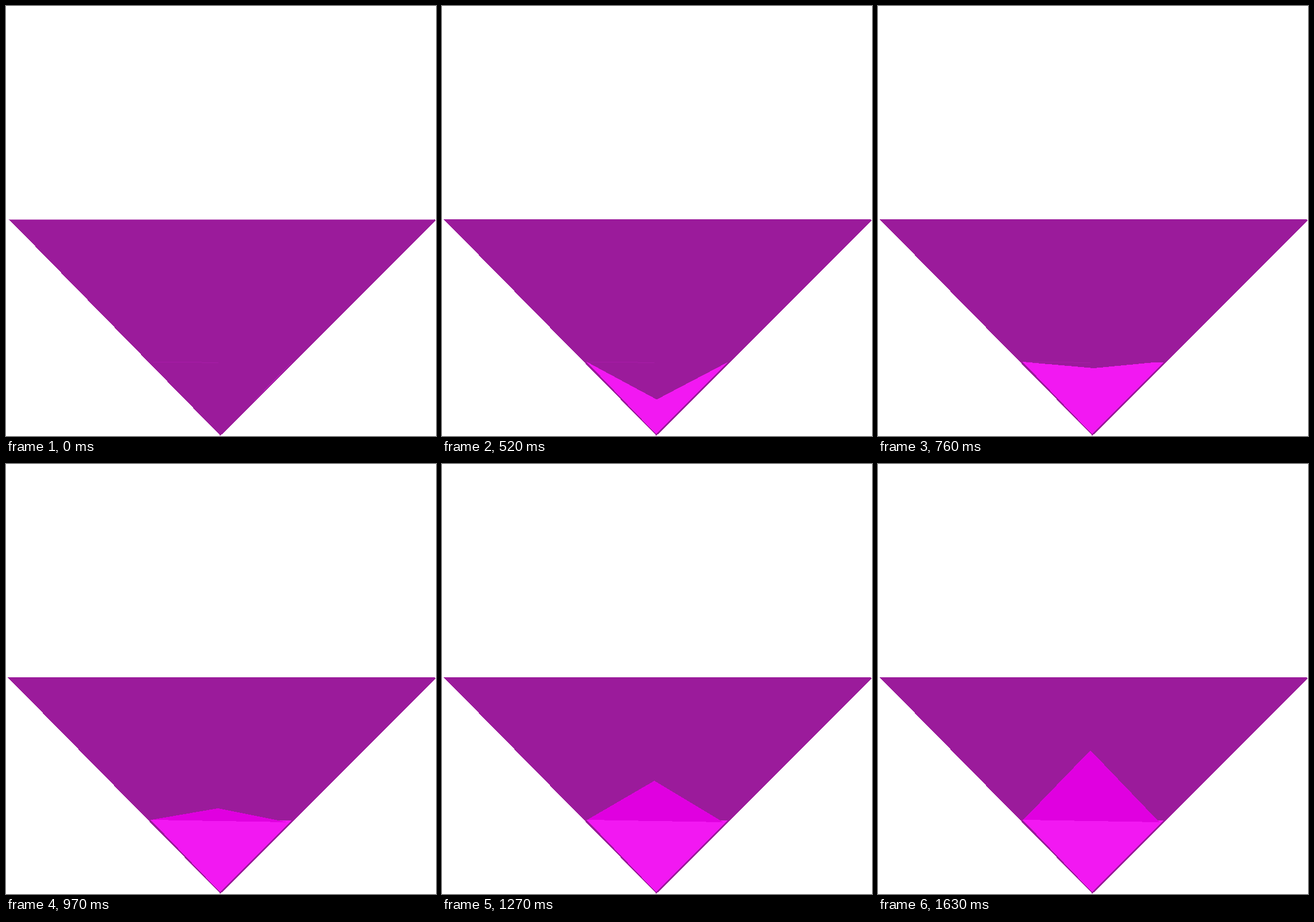
An HTML page for the animation above (1960 ms loop, 749 px wide and 748 px high).

```html
<!DOCTYPE html>
<html lang="en">
<head>
<meta charset="utf-8">
<title>Folding corner</title>
<style>
  html, body { margin: 0; width: 100%; height: 100%; overflow: hidden; background: #fff; }
  svg { display: block; width: 749px; height: 748px; }
</style>
</head>
<body>
<svg viewBox="0 0 749 748" shape-rendering="crispEdges">
  <polygon id="sheet" fill="#9b1b9b"/>
  <path id="teeth" stroke="#fff" stroke-dasharray="1 1" fill="none"/>
  <path id="crease" d="M256 619.5H312L370 620.5" stroke="#a81ca8" fill="none"/>
  <path id="glint" d="M498 620L432 687" stroke="#b81cb8" fill="none"/>
  <polygon id="inside" fill="#f218f2"/>
  <polygon id="flap" fill="#e000e0"/>
</svg>
<script>
  const LOOP = 1960, STEP = 30, START = 250, TURN = 790, END = 1630;
  const el = id => document.getElementById(id);
  const show = (id, on) => el(id).setAttribute('visibility', on ? 'visible' : 'hidden');
  const points = (id, list) => el(id).setAttribute('points', list.join(' '));

  // [time, x, y] of the moving corner
  const lift = [[250, 371, 744], [310, 372, 732], [520, 374, 684.5], [760, 376, 630]];
  const fold = [[790, 369, 621], [970, 369, 599], [1270, 370, 551], [1300, 370, 545], [1630, 370, 498]];

  function along(path, t) {
    let i = 1;
    while (i < path.length - 1 && t > path[i][0]) i++;
    const a = path[i - 1], b = path[i];
    const k = Math.min(1, Math.max(0, (t - a[0]) / (b[0] - a[0])));
    return [a[1] + (b[1] - a[1]) * k, a[2] + (b[2] - a[2]) * k];
  }

  function draw(time) {
    const t = time < START ? 0
      : Math.min(END, START + Math.floor((time - START) / STEP) * STEP);
    const moving = t >= START, folded = t >= TURN;

    points('sheet', [[moving ? 3 : 5, 371], [746, 371], [748, 373], [376, 745], [373, 747]]);
    const toothEnd = t < START ? 746 : t < 520 ? 190 : 0;
    show('teeth', toothEnd > 0);
    el('teeth').setAttribute('d', `M6 371.5H${toothEnd}`);

    show('crease', !folded);
    show('glint', !moving);
    show('inside', moving);
    show('flap', folded);
    if (!moving) return;

    const rim = folded ? [[480, 620]] : t > 700 ? [along(lift, t), [480, 620]] : [along(lift, t)];
    points('inside', [[252, 619], ...rim, [497, 620], [373, 745]]);
    if (folded) points('flap', [[253, 619], along(fold, t), [490, 623]]);
  }

  const begin = performance.now();
  function tick() {
    draw((performance.now() - begin) % LOOP);
    requestAnimationFrame(tick);
  }
  tick();
</script>
</body>
</html>
```
